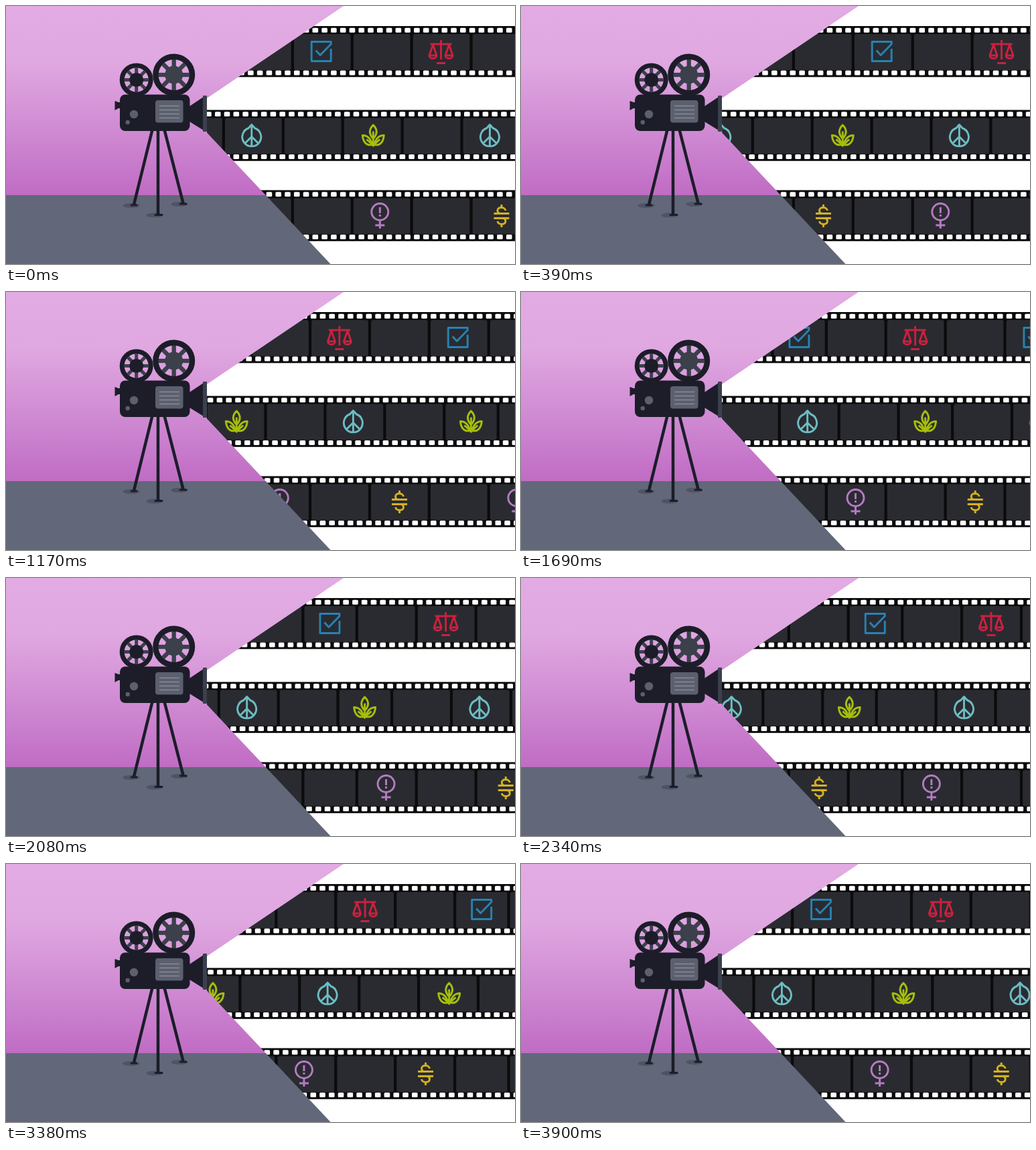
An HTML page that plays this animation: 760 by 386 pixels, repeating every 4.03 s.

```html
<!DOCTYPE html>
<html lang="en">
<head>
<meta charset="utf-8">
<title>Film camera</title>
<style>
html, body { margin: 0; width: 100%; height: 100%; overflow: hidden; background: #fff; }
svg { display: block; width: 760px; height: 386px; }
.icon { fill: none; stroke-width: 2.9; stroke-linejoin: round; }
</style>
</head>
<body>
<svg viewBox="0 0 760 386">
  <defs>
    <linearGradient id="wall" gradientUnits="userSpaceOnUse" x1="0" y1="0" x2="0" y2="283">
      <stop offset="0" stop-color="#e2abe3"/>
      <stop offset=".29" stop-color="#e0a8e1"/>
      <stop offset=".65" stop-color="#d08bd3"/>
      <stop offset="1" stop-color="#c06cc4"/>
    </linearGradient>
    <clipPath id="room"><path d="M0 0H504L300 138V189.500L484.500 386H0Z"/></clipPath>
  </defs>
  <rect width="760" height="386" fill="#fff"/>
  <g id="film"></g>
  <g clip-path="url(#room)">
    <rect width="760" height="284" fill="url(#wall)"/>
    <rect y="283" width="760" height="103" fill="#626779"/>
  </g>
  <g fill="#4f5364">
    <ellipse cx="187" cy="298.500" rx="12.500" ry="3.500"/>
    <ellipse cx="222" cy="313" rx="12.500" ry="3.500"/>
    <ellipse cx="259" cy="296.500" rx="12.500" ry="3.500"/>
  </g>
  <g fill="none" stroke="#1c1d29" stroke-width="4.500">
    <path d="M218.500 185L191 297M227 185V312M236.500 185L264.500 295"/>
    <path stroke-width="3" stroke-linecap="round" d="M187 298H195M223 312.500H233M260 296H269"/>
  </g>
  <g id="reels"></g>
  <g fill="#1c1d29">
    <rect x="170" y="132.500" width="104.500" height="54.500" rx="8"/>
    <path d="M162.500 142L168 144H171V153H168L162.500 156Z"/>
    <path d="M274 150L295 136V186L274 173Z"/>
  </g>
  <rect x="294" y="134" width="6" height="54" rx="1" fill="#3b404d"/>
  <g fill="#5b5f6e">
    <rect x="223" y="141" width="41.500" height="33.500" rx="4"/>
    <circle cx="191" cy="162" r="6.200"/>
    <circle cx="181.700" cy="174" r="3.200"/>
  </g>
  <path d="M229 149.500H259M229 155.500H259M229 161.500H259M229 167.500H259" stroke="#878b98" stroke-width="1.600"/>
</svg>
<script>
const STEP_MS = 130, STEPS = 31;
const PITCH = 88.9, WIDE = 84.7, NARROW = 76.3;
const GAP = PITCH - WIDE;
const PERIOD = 7 * PITCH + NARROW + GAP;
const HOLES = 51;

const icons = {
  check: ['#2683b3', 'M14.500-4V14.500H-14.500V-14.500H14.500V-11M-8-1.500L-1.500 5.500L15-11.500'],
  scales: ['#c9213f', 'M0-17V12M-6.500 17.500H6.500M-16-11H16' +
    'M-12-10L-17.500 6H-6.500ZM12-10L6.500 6H17.500ZM-17.500 6C-17 12-7 12-6.500 6M6.500 6C7 12 17 12 17.500 6'],
  peace: ['#6dbdc3', 'M-4-12A14 14 0 1 0 4-12M0-16V15M-5-11.500L0-17L5-11.500M0 1L-9.500 10.500M0 1L9.500 10.500'],
  leaf: ['#a6be0c', 'M0-16.500C-6.500-10-6.500-3 0 4C6.500-3 6.500-10 0-16.500ZM0-7V16' +
    'M-2 13C-10 15-15 9-16-1C-9-1-3 4-2 13ZM2 13C10 15 15 9 16-1C9-1 3 4 2 13ZM-10 5L0 14L10 5'],
  woman: ['#b57bc2', 'M12.500-6A12.500 12.500 0 1 1-12.500-6A12.500 12.500 0 1 1 12.500-6M0 6.500V19M-7 14H7M0-13V-4M0-2V1'],
  dollar: ['#d5b21f', 'M-11.500-3.500H11.500M-11.500 3.500H11.500M0-17V-12M0 12V17' +
    'M6-8C5-14-6-14-6-8C-6-6-5-4-2-3.500M2 3.500C5 4 6 6 6 8C6 14-5 14-6 8']
};

// Icons map a panel index to [name, offset from the panel's left edge]; panel 0 is the short one.
const strips = [
  { y: 30, start: 82.7, dir: 1, iconY: 38,
    icons: { 0: ['check', 38], 2: ['scales', 41.8], 4: ['check', 40.8], 6: ['scales', 41.8] } },
  { y: 155.5, start: 157.6, dir: -1, iconY: 39,
    icons: { 0: ['leaf', 38], 2: ['peace', 39.8], 4: ['leaf', 43.5], 6: ['peace', 39.8] } },
  { y: 275.5, start: 82.7, dir: 1, iconY: 38.5,
    icons: { 1: ['woman', 41.6], 3: ['dollar', 42.5], 5: ['woman', 39.5], 7: ['dollar', 43.3] } }
];

const rect = (x, y, w, h, r, fill) =>
  `<rect x="${x}" y="${y}" width="${w}" height="${h}" rx="${r}" fill="${fill}"/>`;

function section(strip) {
  let out = '';
  for (let i = 0; i < HOLES; i++) {
    const x = (i + 0.2) * PERIOD / HOLES;
    out += rect(x, 2.8, 8.6, 7, 1.5, '#fff') + rect(x, 66.5, 8.6, 7, 1.5, '#fff');
  }
  for (let i = 0; i < 8; i++) {
    const x = i ? NARROW + GAP + (i - 1) * PITCH : 0;
    out += rect(x, 12, i ? WIDE : NARROW, 54, 3, '#2a2b31');
    if (!strip.icons[i]) continue;
    const [name, offset] = strip.icons[i];
    const [color, path] = icons[name];
    out += `<path class="icon" stroke="${color}" d="${path}" transform="translate(${x + offset} ${strip.iconY})"/>`;
  }
  return out;
}

function reel(cx, cy, r, rim, hub, hubColor) {
  let spokes = '';
  for (let i = 0; i < 8; i++) {
    spokes += `<path d="M0 0V${rim - r}" transform="rotate(${i * 45})"/>`;
  }
  return `<g transform="translate(${cx} ${cy})">
    <g stroke="#3b404b" stroke-width="${r / 5}">${spokes}</g>
    <circle r="${hub}" fill="${hubColor}"/>
    <circle r="${r - rim / 2}" fill="none" stroke="#1c1d29" stroke-width="${rim}"/></g>`;
}

document.getElementById('reels').innerHTML =
  reel(194.7, 110.5, 25, 7, 10.5, '#1c1d29') + reel(250.7, 103, 31.5, 8.5, 13.5, '#3b404b');

const film = document.getElementById('film');
film.innerHTML = strips.map(strip => {
  const part = section(strip);
  const copies = [-1, 0, 1].map(k => `<g transform="translate(${k * PERIOD} 0)">${part}</g>`).join('');
  return `<g transform="translate(0 ${strip.y})">${rect(0, 0, 760, 76.3, 0, '#0b0b0c')}<g>${copies}</g></g>`;
}).join('');
const movers = [...film.children].map(g => g.lastElementChild);

function draw(ms) {
  const step = Math.floor(ms / STEP_MS) % STEPS;
  strips.forEach(({ start, dir }, i) => {
    const x = (start + dir * step * PERIOD / STEPS + PERIOD) % PERIOD;
    movers[i].setAttribute('transform', `translate(${x} 0)`);
  });
}

const begin = performance.now();
function tick() {
  draw(performance.now() - begin);
  requestAnimationFrame(tick);
}
tick();
</script>
</body>
</html>
```
